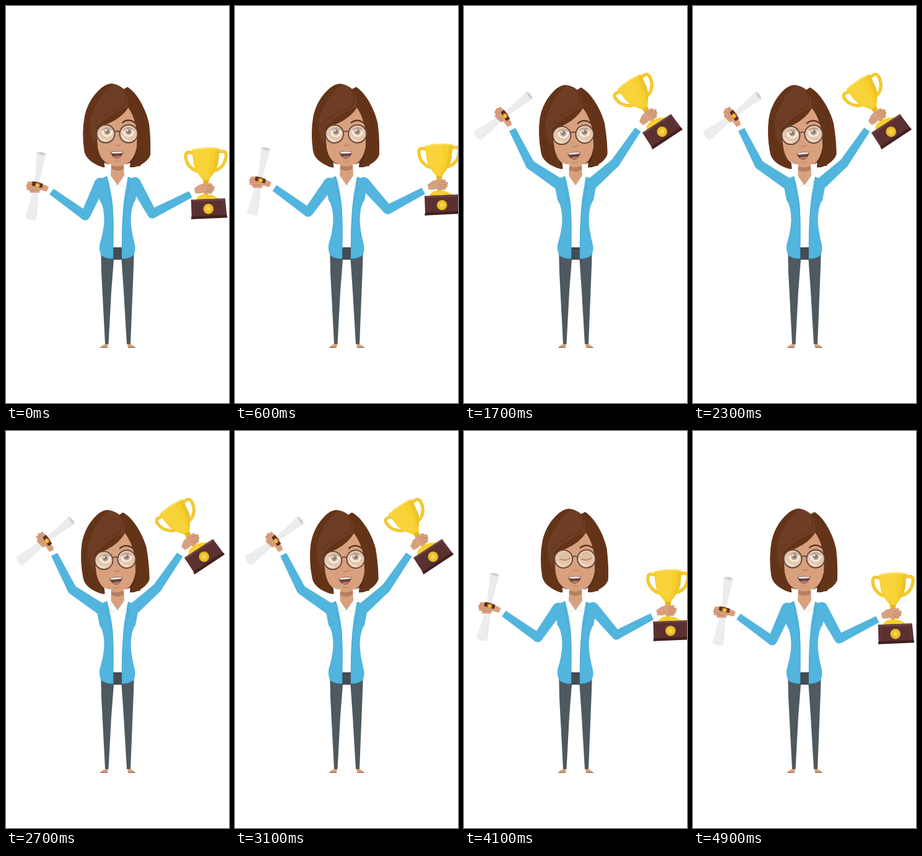
Write an HTML page with a canvas that moves like this. It is 360 px wide and 640 px high and loops after 5000 ms.

```html
<!DOCTYPE html>
<html lang="en">
<head>
<meta charset="utf-8">
<title>Award winner</title>
<style>
html, body { margin: 0; width: 100%; height: 100%; overflow: hidden; background: #fff; }
canvas { display: block; width: 100%; height: 100%; }
</style>
</head>
<body>
<canvas id="stage" width="360" height="640"></canvas>
<script>
const ctx = document.getElementById('stage').getContext('2d');
const LOOP = 5000, STEP = 100;
const RAD = Math.PI / 180;

const SKIN = '#d8a07d', SKIN_DARK = '#b57f62', BLUE = '#52b5de', BLUE_DARK = '#3f9dc7';
const HAIR = '#643419', HAIR_LIGHT = '#6e3e24', HAIR_DARK = '#572b18';
const PANTS = '#4e5960', GOLD = '#f6cf2b', GOLD_DARK = '#e6b622', WOOD = '#5a3031';

// Arm lift over time: 0 = lowered, 1 = raised
const LIFT = [[0, 0], [400, 0], [500, .02], [600, .12], [700, .46], [800, .87], [900, 1.07],
  [1000, 1.09], [1100, 1.04], [1200, .97], [1300, .965], [1500, 1], [3700, 1], [3800, .95],
  [3900, .72], [4000, .38], [4100, .11], [4200, .03], [4300, 0], [5000, 0]];
const BLINK = [[0, 0], [3900, 0], [4000, .5], [4100, 1], [4200, .4], [4300, 0], [5000, 0]];

// Per lift: upper arm angle and length, forearm, hand, then prop rotation
const LEFT = [
  [0, [114.8, 57.3, 215.6, 67, 204, 27, 0]],
  [.11, [125.1, 57.4, 215.3, 67, 207.5, 28, 2]],
  [1, [213.7, 54, 243, 64, 241.6, 27, 43]],
  [1.07, [221.8, 51, 241, 66, 238, 28, 40]]];
const RIGHT = [
  [0, [60.8, 57.3, -26.9, 69.5, -23.6, 26, 0]],
  [.11, [49.2, 58, -27.3, 65, -23.7, 27, 0]],
  [1, [-41.6, 48, -55.6, 65.5, -53.5, 28.6, -31]],
  [1.07, [-44.1, 47.4, -57.3, 66.6, -54.7, 29.4, -33]]];

const mix = (a, b, k) => Array.isArray(a) ? a.map((v, i) => mix(v, b[i], k)) : a + (b - a) * k;

function track(keys, x) {
  let i = 0;
  while (i < keys.length - 2 && x > keys[i + 1][0]) i++;
  const [x0, a] = keys[i], [x1, b] = keys[i + 1];
  return mix(a, b, (x - x0) / (x1 - x0));
}

function fill(d, color) {
  ctx.fillStyle = color;
  ctx.fill(new Path2D(d));
}

function line(d, color, width = 1) {
  ctx.strokeStyle = color;
  ctx.lineWidth = width;
  ctx.lineCap = ctx.lineJoin = 'round';
  ctx.stroke(new Path2D(d));
}

function oval(x, y, rx, ry, color) {
  ctx.beginPath();
  ctx.ellipse(x, y, rx, ry, 0, 0, 7);
  ctx.fillStyle = color;
  ctx.fill();
}

function group(x, y, deg, draw) {
  ctx.save();
  ctx.translate(x, y);
  ctx.rotate(deg * RAD);
  draw();
  ctx.restore();
}

const polar = ([x, y], deg, len) => [x + Math.cos(deg * RAD) * len, y + Math.sin(deg * RAD) * len];

function limb(a, b, ra, rb) {
  const ang = Math.atan2(b[1] - a[1], b[0] - a[0]);
  const nx = -Math.sin(ang), ny = Math.cos(ang);
  ctx.fillStyle = BLUE;
  ctx.beginPath();
  ctx.moveTo(a[0] + nx * ra, a[1] + ny * ra);
  ctx.lineTo(b[0] + nx * rb, b[1] + ny * rb);
  ctx.lineTo(b[0] - nx * rb, b[1] - ny * rb);
  ctx.lineTo(a[0] - nx * ra, a[1] - ny * ra);
  ctx.fill();
  oval(a[0], a[1], ra, ra, BLUE);
}

function arm(shoulder, pose, prop) {
  const elbow = polar(shoulder, pose[0], pose[1]);
  const cuff = polar(elbow, pose[2], pose[3]);
  const hand = polar(cuff, pose[4], pose[5]);
  limb(shoulder, elbow, 9.3, 7.5);
  limb(elbow, cuff, 7.5, 5.6);
  group(hand[0], hand[1], pose[6], prop);
}

function star(x, y, r, color) {
  ctx.beginPath();
  for (let i = 0; i < 10; i++) {
    const p = polar([x, y], i * 36 - 90, i % 2 ? r * .45 : r);
    ctx.lineTo(p[0], p[1]);
  }
  ctx.fillStyle = color;
  ctx.fill();
}

function diploma() {
  fill('M2 -2L16 1L20 4L17 11L8 9L1 11Z', SKIN);
  group(0, 0, 9, () => {
    fill('M-3.5 0Q-4 -28 -7.5 -51Q0 -54 8 -51Q5 -28 3.5 0Z', '#ebecee');
    fill('M-3.5 0Q-5 25 -9 55Q-1 60 9 56Q7 25 3.5 0Z', '#ededef');
    line('M4 -10L6 -45M4 12L7 50', '#e4e6e9');
    oval(.3, -51, 7.5, 2.6, '#d8dbdf');
    oval(1.5, -51, 4, 1.3, '#c5cad0');
  });
  line('M-12 -2.5H3M-14 2H5M-13 6.5H5M-8 10.5H3', SKIN, 5);
  line('M-14 -.3H-5M-14 4.3H-3M-11 8.6H2', SKIN_DARK, .8);
  fill('M-6 -5.5L1 -4L11 -1.5L9.5 5L1 4L-7 1Z', '#5a2a1e');
  line('M-5 -3L9 1', '#83422a', 1);
  oval(2, 1, 3.8, 3.8, '#dfa32e');
  star(2, 1, 2.8, '#f6cf4c');
}

function trophy() {
  const handles = 'M-20 -56C-31 -60 -33 -55 -31 -46C-29 -36 -20 -28 -12 -27' +
    'M21 -58C32 -61 35 -57 33 -48C31 -37 23 -29 14 -28';
  line(handles, GOLD_DARK, 5);
  line(handles, GOLD, 3.2);
  fill('M-4 -17H6L4 12H-2Z', GOLD_DARK);
  fill('M-15 18Q-12 13 -6 11H8Q14 12 21 17L20 19H-14Z', GOLD);
  fill('M-22 -62Q0 -67 23 -64L21 -41C19 -28 10 -21 6 -13H-4C-9 -20 -17 -27 -19 -40Z', GOLD);
  fill('M-20 -60Q0 -64 8 -63L6 -32L2 -15C-8 -20 -15 -28 -17 -41Z', '#f8d43a');
  fill('M17 -63L23 -64L21 -41C19 -28 10 -21 6 -13Q15 -34 17 -63Z', '#eec42a');
  line('M-21 -61Q0 -65.5 22 -63', '#fbe069', 1.8);
  fill('M-23 19L32 17L35 47L-22 50Z', WOOD);
  fill('M-23 19L32 17L32.3 20L-23 22Z', '#704345');
  fill('M-22.4 46L34.7 43.5L35.5 48L-23 50.5Z', '#42201f');
  line('M-19 25L-18 43M29 23L31 41', '#6b3d3e', .8);
  oval(5, 34, 8.3, 8.3, GOLD_DARK);
  oval(5, 34, 6.7, 6.7, '#efbf2c');
  star(5, 34, 5, '#f9dc58');
  fill('M-18 1L-10 -5L-3 -7L2 -3L2 6L-8 9L-16 9Z', SKIN);
  line('M-2 -5H9M-1 -.8H13M-1 3.5H12M-1 7.3H9', SKIN, 4.8);
  line('M2 -2.8H12M1 1.5H13M2 5.6H11', SKIN_DARK, .8);
}

function eye(x, lookX, blink) {
  oval(x, 206, 14.5, 14.5, '#dfb797');
  oval(lookX, 203.5, 9, 7.5, '#f2eae3');
  oval(lookX, 202.5, 5.2, 5.4, '#a38677');
  oval(lookX, 202.5, 2.8, 2.9, '#5e4a44');
  oval(lookX - 1.8, 200.7, 1.4, 1.4, '#fff');
  if (blink) {
    ctx.save();
    ctx.beginPath();
    ctx.rect(x - 15, 190, 30, 5 + 16 * blink);
    ctx.clip();
    oval(lookX, 203.5, 9.6, 8.4, '#d8ad8e');
    ctx.restore();
    if (blink > .8) line(`M${lookX - 8} 206Q${lookX} 210 ${lookX + 8} 205`, '#68483a', 1.2);
  } else {
    line(`M${lookX - 8} 200Q${lookX} 192.5 ${lookX + 8} 200`, '#7a5a4b', 1.1);
  }
  oval(x, 206, 14, 14, 'rgba(250,236,215,.28)');
  line(`M${x - 10} 210Q${x - 7} 217 ${x + 1} 217`, 'rgba(255,255,255,.5)', 2);
  ctx.beginPath();
  ctx.arc(x, 206, 14.5, 0, 7);
  ctx.strokeStyle = '#584641';
  ctx.lineWidth = 1.8;
  ctx.stroke();
}

function head(blink) {
  fill('M171 125Q181 126 190 134L196 130.5C210 138 226 165 231 190Q234 215 233 240C231 247 222 256 207 260H156C140 254 128 246 126 232Q122 203 127 177Q133 150 154 132Q163 125 171 125Z', HAIR);
  fill('M146 196L148 232Q152 250 161 260H200L211 240V190Z', HAIR_DARK);
  fill('M169 250H191V276L180 290L169 276Z', SKIN);
  fill('M169 254Q180 262 191 254V262Q180 269 169 262Z', SKIN_DARK);
  fill('M146 200L197 163Q208 176 212 198L211 228Q207 247 196 254Q180 263 164 254Q151 247 148 228Z', SKIN);
  fill('M146 218Q148 238 160 258L150 258Q141 240 142 218Z', HAIR);
  fill('M212 205Q213 236 205 259L217 258L222 205Z', HAIR);
  line('M188 188Q198 180 209 189', '#57301f', 2.2);
  fill('M190 134Q203 141 198 163Q187 180 166 189Q153 193 146 201L143 222Q134 205 136 182Q146 148 172 127Q183 127 190 134Z', HAIR_LIGHT);
  fill('M198 163Q187 180 166 189Q153 193 146 201L145 196Q168 172 198 163Z', HAIR);
  fill('M190 134Q208 143 215 172Q220 200 212 222Q213 187 197 163Q199 147 190 134Z', HAIR);
  line('M190 134Q197 147 189 162Q158 172 138 194', HAIR_DARK, .8);
  line('M199 137Q219 157 224 202M131 190Q128 220 138 246', HAIR_DARK, .7);
  eye(161, 163.5, blink);
  eye(198, 198, blink);
  line('M175.5 203Q179.5 200 183.5 203', '#584641', 1.8);
  line('M177 224Q181 227 185 223', SKIN_DARK, 1.3);
  fill('M168.5 235Q180 233 189.5 234.5Q187 245 179 246.5Q171 245 168.5 235Z', '#6d4038');
  fill('M169.5 235.2Q180 233.8 188.5 234.8L187.5 237Q179 238.2 171 237.4Z', '#f3ebe6');
  fill('M172.5 243Q180 240 186 242Q183 246 179 246Q175 246 172.5 243Z', '#b0766a');
  line('M175 250Q180 252 184 250', SKIN_DARK, .8);
}

function legs() {
  fill('M153 385H207L206 420L201 545H195L190 460L186.5 409H174L170 460L165.5 545H160L154 430Z', PANTS);
  fill('M173 389H187V409H173Z', '#434d54');
  line('M173 391H187', '#39434a', 1);
  fill('M160 545H165L164 551H152Q153 548 160 545Z', SKIN);
  fill('M196 545H201Q207 548 209 551H197Z', SKIN);
  line('M153 550.5H163M198 550.5H208', '#78523f', 1.2);
}

function torso() {
  fill('M158.5 252.5Q165 256 170 255L169 274L180 289L191 274L190 255Q195 256 200.5 252.5L198 290L188 330V389H173L171 330L163 290Z', '#fff');
  line('M169 273L179 288L170 291L163 281M191 273L181 288L190 291L197 281', '#d8dcde', .8);
  fill('M163 274Q150 279 146 287L151 313Q158 322 158.5 345Q158 362 151 385Q150 398 155 403Q163 408 173 407V389Q174.5 345 172 318Q169 294 163 274Z', BLUE);
  fill('M197 275Q211 280 214 287L209 313Q202 322 201.5 345Q202 362 208 385Q210 397 205 402Q197 408 187 407V370Q188 330 191.5 305Q194 291 197 275Z', BLUE);
  line('M163 276Q165 286 163 291L171.5 320Q174 350 173 407', BLUE_DARK, .6);
  line('M197 277Q195 286 199 291L191 320Q187 350 187 407', BLUE_DARK, .6);
  line('M173 407Q162 408 154 402M187 407Q198 408 206 402', BLUE_DARK, .8);
}

function draw(t) {
  const lift = track(LIFT, t);
  ctx.fillStyle = '#fff';
  ctx.fillRect(0, 0, 360, 640);
  legs();
  group(180, 262 + 1.5 * lift, -3.2 * lift, () => {
    ctx.translate(-180, -262);
    head(track(BLINK, t));
  });
  torso();
  arm([152, 286], track(LEFT, lift), diploma);
  arm([208, 285], track(RIGHT, lift), trophy);
}

const start = performance.now();
function tick() {
  // The motion is held on 100 ms steps
  const t = (performance.now() - start + 5) % LOOP;
  draw(Math.floor(t / STEP) * STEP);
  requestAnimationFrame(tick);
}
tick();
</script>
</body>
</html>
```
